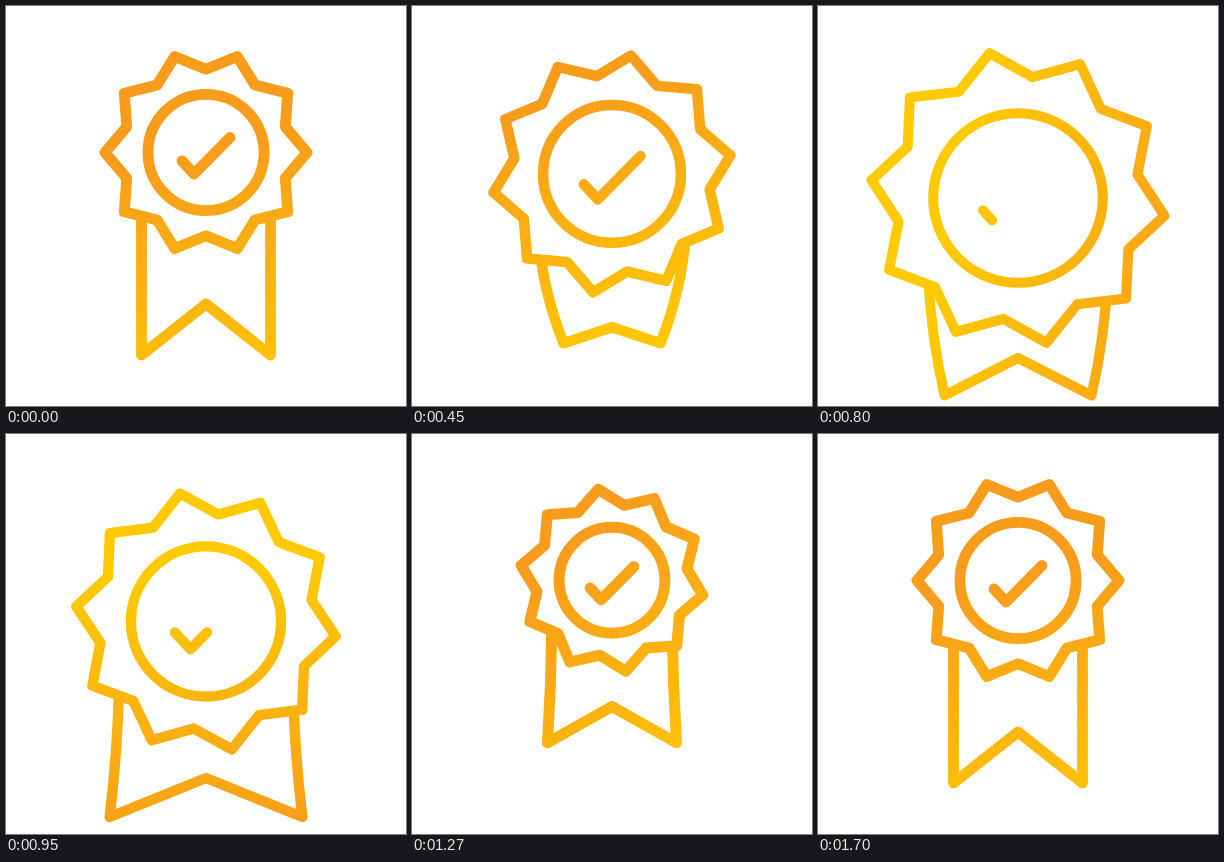
Animation of 400 by 400 pixels, one loop 1.72 s. Source, as an HTML page with a canvas:

```html
<!DOCTYPE html>
<html lang="en">
<head>
<meta charset="utf-8">
<title>Award badge</title>
<style>
  html, body { margin: 0; width: 100%; height: 100%; overflow: hidden; background: #fff; }
  canvas { display: block; width: 100vmin; height: 100vmin; }
</style>
</head>
<body>
<canvas id="stage" width="400" height="400"></canvas>
<script>
const ctx = document.getElementById('stage').getContext('2d');
const LOOP = 1720, CX = 200, POINTS = 10, CORNER = 0.263;

const mix = (a, b, u) => a + (b - a) * u;
const progress = (t, from, to) => Math.min(1, Math.max(0, (t - from) / (to - from)));

// Smoothstep; a higher snap moves the speed towards the start.
function ease(u, snap) {
  const v = 1 - (1 - u) ** snap;
  return v * v * (3 - 2 * v);
}

// Sums eased moves [from, to, value]; moves that overlap blend.
function chain(t, snap, rest, ...moves) {
  let value = rest, goal = rest;
  for (const [from, to, next] of moves) {
    value += (next - goal) * ease(progress(t, from, to), snap);
    goal = next;
  }
  return value;
}

// The badge swells, shrinks below its rest size and settles.
const swell = (t, swollen, rest, big, small) => chain(t, 1.8, rest,
  [320, swollen, big], [900, 1350, small], [1320, 1620, rest]);

function makePaint(degrees, shift) {
  const a = degrees * Math.PI / 180;
  const dx = Math.sin(a), dy = -Math.cos(a);
  const from = shift + 140, to = shift - 140;
  const paint = ctx.createLinearGradient(
    200 + dx * from, 200 + dy * from, 200 + dx * to, 200 + dy * to);
  paint.addColorStop(0, '#f89c1c');
  paint.addColorStop(1, '#ffcb00');
  return paint;
}

function drawRibbon(t, topY) {
  const topW = swell(t, 840, 64.5, 90, 60);
  const notchY = swell(t, 780, 298, 352, 272);
  const bottomY = chain(t, 1.4, 349,
    [320, 460, 337], [440, 930, 393], [880, 1330, 308], [1320, 1620, 349]);
  const bottomW = chain(t, 1, 64.5,
    [320, 500, 45], [540, 1080, 105], [1060, 1270, 64.5]);
  const bendW = mix(bottomW, topW, 0.85), bendY = (topY + bottomY) / 2;

  ctx.beginPath();
  ctx.moveTo(CX - topW, topY);
  ctx.quadraticCurveTo(CX - bendW, bendY, CX - bottomW, bottomY);
  ctx.lineTo(CX, notchY);
  ctx.lineTo(CX + bottomW, bottomY);
  ctx.quadraticCurveTo(CX + bendW, bendY, CX + topW, topY);
  ctx.stroke();
}

function drawStar(cy, radius, degrees) {
  ctx.beginPath();
  for (let i = 0; i < POINTS * 2; i++) {
    const a = degrees * Math.PI / 180 + i * Math.PI / POINTS;
    const r = i % 2 ? radius * 0.825 : radius;
    ctx.lineTo(CX + r * Math.cos(a), cy + r * Math.sin(a));
  }
  ctx.closePath();
  ctx.fill();
  ctx.stroke();
}

// Draws the part of the check mark between two fractions of its length.
function drawCheck(cy, scale, start, end) {
  if (end - start < 0.002) return;
  const lineTo = p => {
    const short = Math.min(1, p / CORNER);
    const long = Math.max(0, (p - CORNER) / (1 - CORNER));
    ctx.lineTo(CX + scale * (-24 + 12 * short + 36 * long),
      cy + scale * (8.5 + 13 * short - 36.5 * long));
  };
  ctx.beginPath();
  lineTo(start);
  if (start < CORNER && end > CORNER) lineTo(CORNER);
  lineTo(end);
  ctx.stroke();
}

function render(t) {
  const radius = chain(t, 1.8, 101,
    [320, 800, 147.5], [850, 1300, 92], [1300, 1600, 101]);
  const cy = swell(t, 750, 146.5, 192, 146);
  const turn = chain(t, 1, 0,
    [320, 460, -9], [485, 1005, 179], [860, 1420, 366], [1400, 1600, 360]);
  const shift = chain(t, 1, -80, [320, 620, 70], [950, 1400, -80]);

  ctx.fillStyle = '#fff';
  ctx.fillRect(0, 0, 400, 400);
  ctx.strokeStyle = makePaint(turn - 12, shift);
  ctx.lineWidth = 12.5 - radius / 60;
  ctx.lineCap = ctx.lineJoin = 'round';

  drawRibbon(t, cy + radius / 2);
  drawStar(cy, radius, turn);
  ctx.beginPath();
  ctx.arc(CX, cy, radius * 0.575, 0, Math.PI * 2);
  ctx.stroke();

  const erased = progress(t, 440, 740) ** 1.6;
  const drawn = progress(t, 748, 1135);
  if (erased < 1) drawCheck(cy, radius / 101, erased, 1);
  else drawCheck(cy, radius / 101, 0, drawn);
}

const began = performance.now();
function tick() {
  render((performance.now() - began) % LOOP);
  requestAnimationFrame(tick);
}
tick();
</script>
</body>
</html>
```
